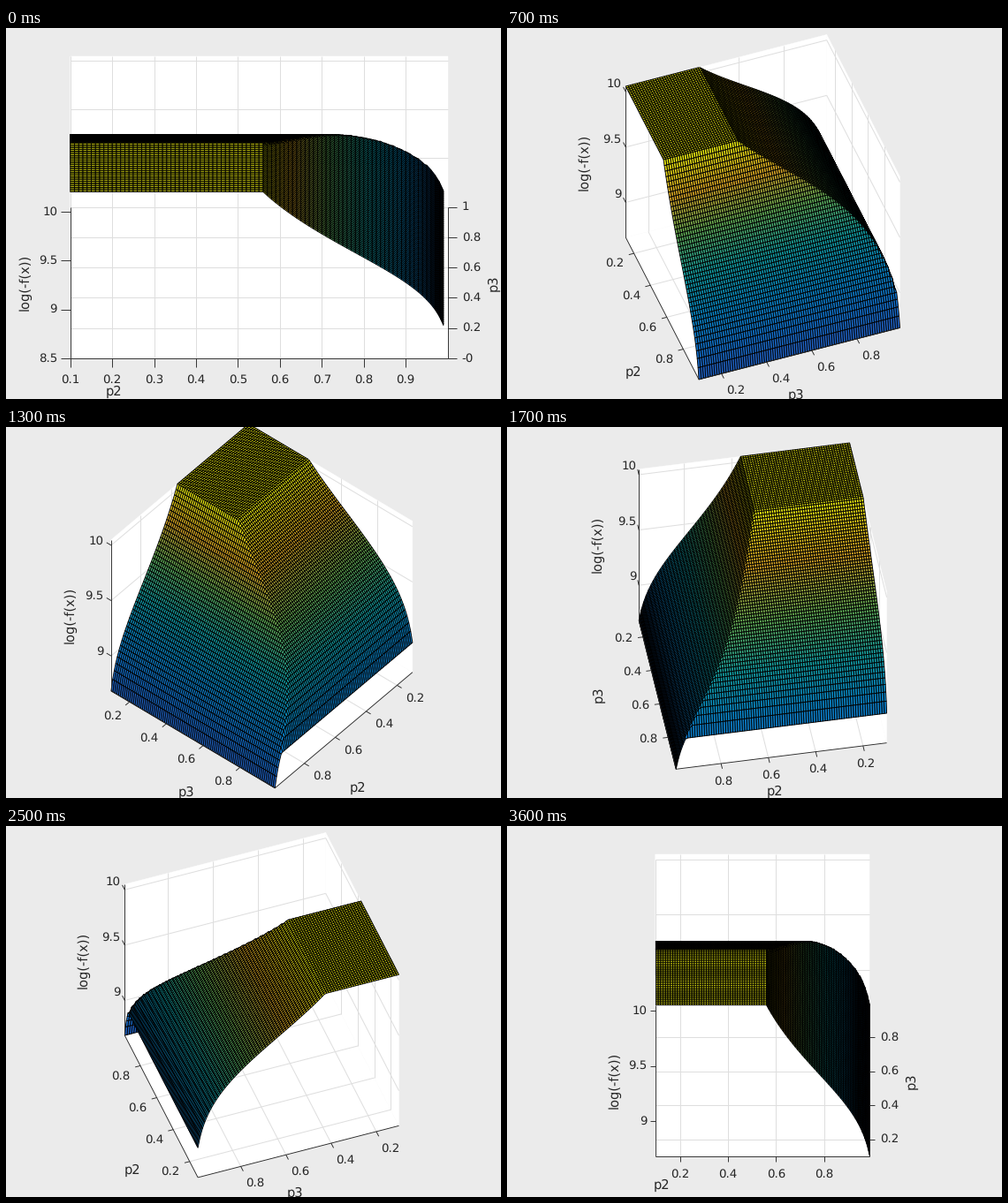
Write a matplotlib script that moves like this. It is 560 px wide and 420 px high and loops after 3700 ms.

```python
import numpy as np
import matplotlib.pyplot as plt
from matplotlib.animation import FuncAnimation
from matplotlib.collections import LineCollection, PolyCollection
from matplotlib.colors import LinearSegmentedColormap

W, H, DPI = 560, 420, 100
PX = 72 / DPI
FRAMES = 37
S45 = np.sqrt(0.5)
INK = "#262626"
TOP = 10.05

plt.rcParams.update({"font.family": "DejaVu Sans", "text.hinting": "none"})

cmap = LinearSegmentedColormap.from_list("heights", [
    "#2858bc", "#1272d0", "#0888c8", "#12a0a4", "#62b058", "#dca624", "#ecec10"])


def falloff(t, knee, pole, a, b):
    """Flat up to the knee, then a steep - gentle - steep descent."""
    t = np.maximum(t, knee)
    drop = a * np.log((t - pole) / (knee - pole))
    drop += b * np.log((1.01 - knee) / (1.01 - t))
    return TOP - drop


p = np.linspace(0.1, 0.99, 90)
X, Y = np.meshgrid(p, p)
Z = np.minimum(falloff(X, 0.56, 0.4, 0.565, 0.202),
               falloff(Y, 0.427, 0.2, 0.28, 0.222))
face_rgb = cmap((Z[:-1, :-1] - Z.min()) / np.ptp(Z)).reshape(-1, 4)


def make_view(lims, steps, width, cx, tick):
    """Limits, tick values, half box size, centre and tick length in pixels."""
    ticks = [step * np.arange(np.ceil(lo / step - 1e-9), np.ceil(hi / step))
             for (lo, hi), step in zip(lims, steps)]
    return dict(lims=lims, ticks=ticks, cx=cx, tick=tick,
                half=np.array([width / 2, 121, 121]))


LOOSE = make_view([(0.1, 1), (0, 1.01), (8.5, TOP)], (0.1, 0.2, 0.5),
                  426.8, 286.2, 10.7)
TIGHT = make_view([(0.1, 0.99), (0.1, 0.99), (Z.min(), TOP)], (0.2, 0.2, 0.5),
                  242, 289.4, 6)
LOOSE["lims"][1] = (0, 1)

fig = plt.figure(figsize=(W / DPI, H / DPI), dpi=DPI, facecolor="#ebebeb")
ax = fig.add_axes([0, 0, 1, 1])


def label(pos, text, size, ha="center", **kw):
    ax.text(*pos, text, fontsize=size * PX, color=INK, zorder=5,
            ha=ha, va="center", **kw)


def lines(segs, color, width, z):
    ax.add_collection(LineCollection(
        segs, colors=color, linewidths=width * PX, zorder=z))


def span(k, v, side, end=-1):
    """Edge of the box along axis k, or a point on it."""
    return (v, side, end) if k == 0 else (side, v, end)


def draw(i):
    ax.clear()
    ax.set(xlim=(0, W), ylim=(H, 0))
    ax.axis("off")

    view = LOOSE if i == 0 else TIGHT
    half, tick = view["half"], view["tick"]
    reach = tick + 5.5
    az = np.radians(10 * i)
    c, s = np.cos(az), np.sin(az)

    def project(u):
        x, y, z = np.moveaxis(np.asarray(u, float) * half, -1, 0)
        return np.stack([view["cx"] + c * x + s * y,
                         202.65 - S45 * (c * y - s * x + z)], -1)

    def norm(v, k):
        lo, hi = view["lims"][k]
        return 2 * (v - lo) / (hi - lo) - 1

    def outward(k, sign):
        d = sign * np.array([(c, s * S45), (s, -c * S45)][k])
        return d / np.hypot(*d)

    # sides facing the viewer; the nudge settles the quarter turns
    fx = 1 if np.sin(az + 1e-4) > 0 else -1
    fy = -1 if np.cos(az + 1e-4) > 0 else 1

    # floor and back walls
    ring = [(-1, -1), (1, -1), (1, 1), (-1, 1)]
    walls = [[(a, b, -1) for a, b in ring],
             [(-fx, a, b) for a, b in ring],
             [(a, -fy, b) for a, b in ring]]
    ax.add_collection(PolyCollection(project(walls), facecolors="w",
                                     edgecolors="w", linewidths=0.3, zorder=0))

    # grid
    xs, ys, zs = (norm(view["ticks"][k], k) for k in range(3))
    grid = []
    for v in xs:
        grid += [[(v, -1, -1), (v, 1, -1)], [(v, -fy, -1), (v, -fy, 1)]]
    for v in ys:
        grid += [[(-1, v, -1), (1, v, -1)], [(-fx, v, -1), (-fx, v, 1)]]
    for v in zs:
        grid += [[(-fx, -1, v), (-fx, 1, v)], [(-1, -fy, v), (1, -fy, v)]]
    lines(project(grid), "#dedede", 1, 1)

    # surface, painted from back to front
    q = project(np.stack([norm(X, 0), norm(Y, 1), norm(Z, 2)], -1))
    quads = np.stack([q[:-1, :-1], q[:-1, 1:], q[1:, 1:], q[1:, :-1]], 2)
    order = np.argsort((s * X - c * Y)[:-1, :-1].ravel(), kind="stable")
    mesh = PolyCollection(quads.reshape(-1, 4, 2)[order],
                          facecolors=face_rgb[order], edgecolors="k",
                          linewidths=0.92 * PX, zorder=2)
    mesh.set_snap(False)
    ax.add_collection(mesh)

    # p2 and p3 axes on the front floor edges
    rulers = []
    for k, name, side, turn in ((0, "p2", fy, fy * s), (1, "p3", fx, fx * c)):
        d = outward(1 - k, side)
        rulers.append(project([span(k, -1, side), span(k, 1, side)]))
        for v in view["ticks"][k]:
            base = project(span(k, norm(v, k), side))
            rulers.append([base, base + d * tick])
            ha = "center"
            if abs(d[0]) > 0.3:
                ha = "left" if d[0] > 0 else "right"
            drop = 8.7 if abs(d[1]) > 0.2 else 0
            label(base + d * reach + (0, drop), f"{v:g}", 13.33, ha)

        mid = project(span(k, 0, side))
        sign, a = np.sign(turn), abs(turn)
        if a > 0.98:
            gap = tick + (41 if a > 0.999 else 61)
            label(mid + (sign * gap, 0), name, 14.67, rotation=90)
        else:
            ox = sign * (-8 + 30 * a**2 + 18 * a**4)
            if a < 1e-6:
                ox = -49 - 0.542 * half[k]
            label(mid + (ox, 27 + tick + 42 * a), name, 14.67)

    # vertical axis on the leftmost corner
    corner = (fy, -fx)
    d = min((outward(k, corner[k]) for k in (0, 1)), key=lambda e: e[1])
    rulers.append(project([(*corner, -1), (*corner, 1)]))
    for v, u in zip(view["ticks"][2], zs):
        base = project((*corner, u))
        rulers.append([base, base + d * tick])
        label(base + d * (reach - 1.5), f"{v:g}", 13.33, "right")
    label(project((*corner, 0)) - (tick + 40.8, 0), "log(-f(x))", 14.67,
          rotation=90)
    lines(rulers, INK, 0.9, 3)
    return []


anim = FuncAnimation(fig, draw, frames=FRAMES, interval=100, repeat=True,
                     init_func=lambda: [])
plt.show()
```
